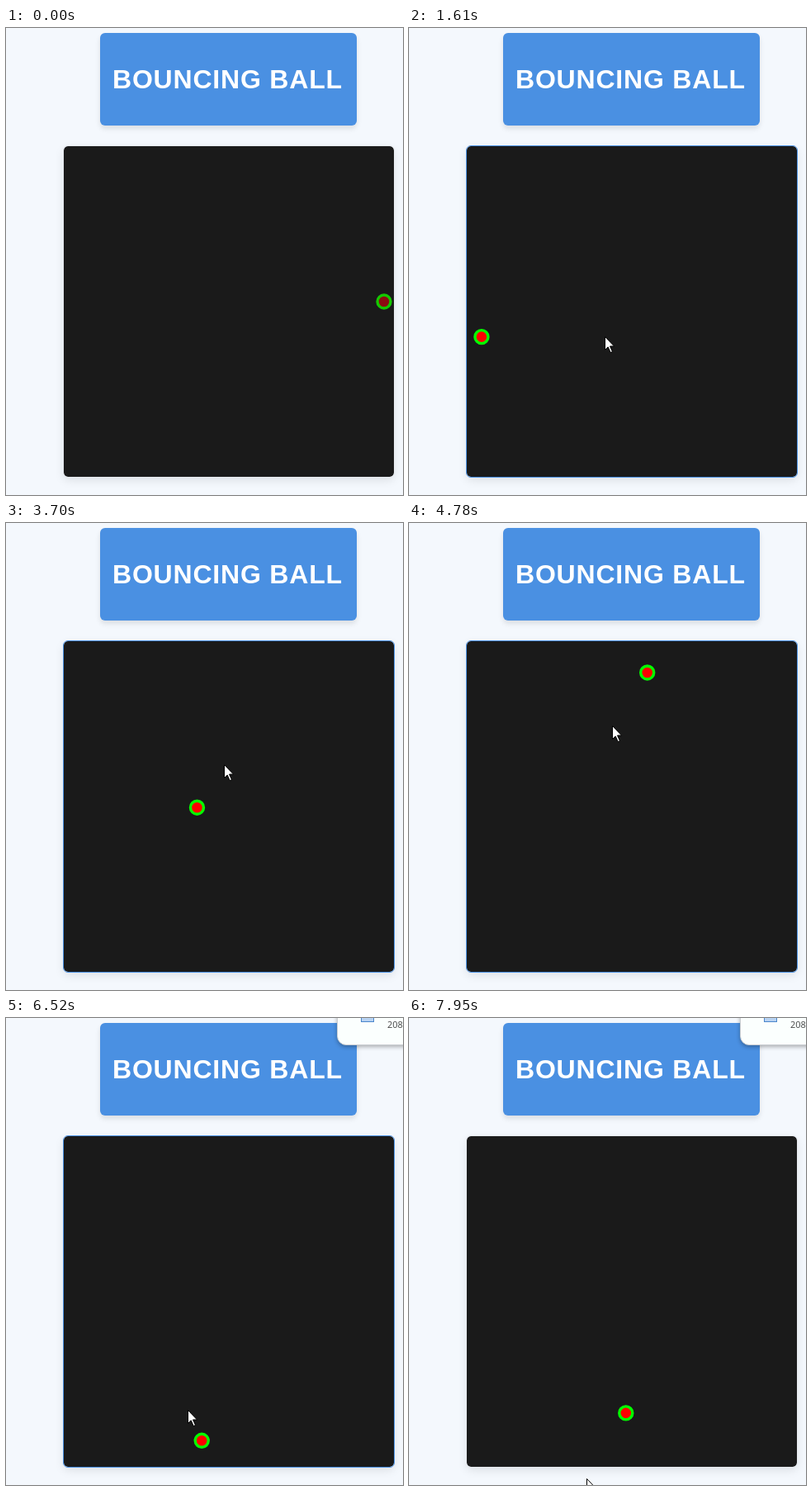
Recreate the animation shown at these times as an HTML page. Size 481 by 565 pixels, loop 8000 ms.

```html
<!DOCTYPE html>
<html lang="en">
<head>
<meta charset="utf-8">
<title>Bouncing ball</title>
<style>
  html, body { margin: 0; width: 100%; height: 100%; overflow: hidden; background: #f4f8fd; }
  div, svg { position: absolute; box-sizing: border-box; }
  #header { left: 114px; top: 6px; width: 311px; height: 112px; border-radius: 6px;
    background: #4a90e2; box-shadow: 0 4px 6px rgba(0, 0, 0, .1); }
  #arena { left: 70px; top: 143px; width: 400px; height: 400px; border-radius: 5px;
    background: #1a1a1a; outline: 1px solid #e4e8ed; box-shadow: 0 4px 12px rgba(0, 0, 0, .1); }
  #arena.hover { outline-color: #4a90e2; }
  #toast { left: 401px; top: -20px; width: 100px; height: 53px; border-radius: 11px;
    background: #fbfffe; border: 1px solid #c9cdd1; box-shadow: 0 2px 5px rgba(0, 0, 0, .3);
    font: 11px/14px "Open Sans", sans-serif; color: #444; }
  #toast span { position: absolute; left: 60px; top: 20px; }
  #toast i { position: absolute; left: 28px; top: 15px; width: 14px; height: 7px;
    background: #b9d3f2; border: 1px solid #4a86cc; }
  svg { left: 0; top: 0; }
  text { font: bold 32px "Liberation Sans", Arial, sans-serif; letter-spacing: .8px; fill: #fff; }
</style>
</head>
<body>
<div id="header"></div>
<div id="arena"></div>
<div id="toast"><i></i><span>208</span></div>
<svg width="481" height="565">
  <text x="129" y="73">BOUNCING BALL</text>
  <circle id="ball" r="8" stroke-width="3.4"/>
  <path id="cursor" d="M.5 .5V16.5L4.2 12.9L7.2 19.6L9.5 18.6L6.5 12H11.5Z" fill="#fff" stroke="#000"/>
</svg>
<script>
const LOOP = 8000, HOVER_START = 70, HOVER_END = 7330, TOAST_START = 5400;

// The pointer pulls the ball like a spring, so each axis swings between
// turning points [time, position]; the pointer eases between its rests alike.
const ballX = [[70, 458], [1768, 80], [2674, 362], [4044, 209], [5000, 300],
  [6398, 236], [7573, 281], [8600, 220]];
const ballY = [[600, 331], [1000, 320], [2000, 400], [2687, 355], [3300, 390],
  [4620, 173], [6318, 533], [7230, 348], [8600, 588]];
const cursorX = [[70, 466], [700, 187], [2510, 285], [3700, 264], [5720, 232],
  [7270, 210], [7950, 215]];
const cursorY = [[70, 345], [700, 352], [2510, 394], [3700, 292], [4400, 211],
  [5720, 389], [7270, 551], [7950, 557]];

const $ = id => document.getElementById(id);

// Half a cosine wave from one turning point to the next.
function swing(points, t) {
  const next = points.findIndex(([time]) => time > t);
  if (next === 0) return points[0][1];
  if (next < 0) return points.at(-1)[1];
  const [t0, from] = points[next - 1], [t1, to] = points[next];
  return from + (to - from) * (1 - Math.cos(Math.PI * (t - t0) / (t1 - t0))) / 2;
}

function draw(t) {
  const started = t >= HOVER_START;
  const ball = $("ball"), cursor = $("cursor");
  ball.setAttribute("cx", swing(ballX, t));
  ball.setAttribute("cy", swing(ballY, t));
  ball.setAttribute("fill", started ? "#f00" : "#8c0c12");
  ball.setAttribute("stroke", started ? "#0f0" : "#14c800");
  const tip = [cursorX, cursorY].map(axis => Math.round(swing(axis, t)));
  cursor.setAttribute("transform", `translate(${tip})`);
  cursor.style.display = started ? "" : "none";
  $("arena").classList.toggle("hover", started && t < HOVER_END);
  $("toast").style.display = t >= TOAST_START ? "" : "none";
}

const origin = performance.now();
function tick() {
  draw((performance.now() - origin) % LOOP);
  requestAnimationFrame(tick);
}
tick();
</script>
</body>
</html>
```
